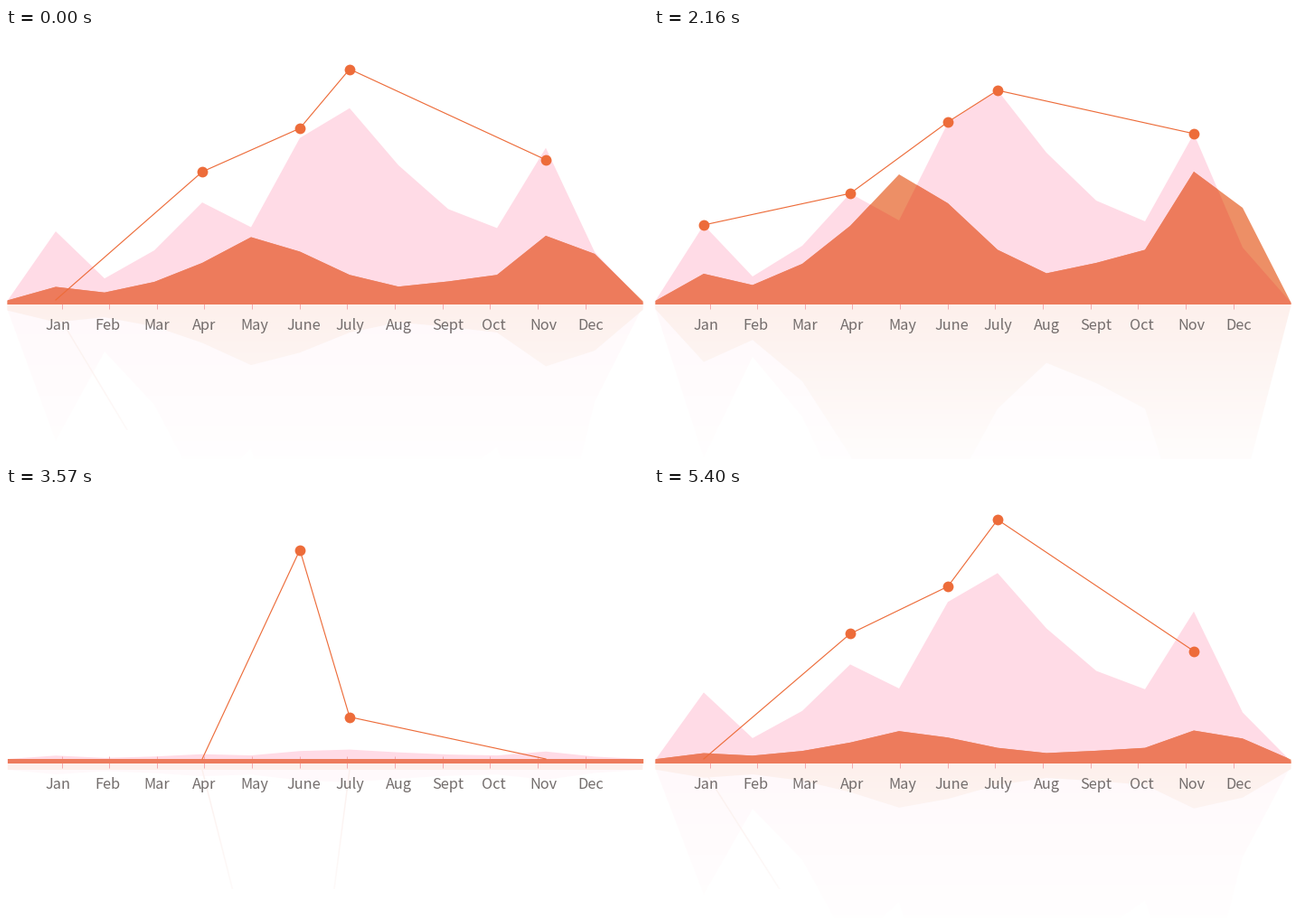
Animation of 710 by 477 pixels, one loop 5.43 s. Source, as a matplotlib script:

```python
import numpy as np
import matplotlib.pyplot as plt
from matplotlib.animation import FuncAnimation
from matplotlib.patches import Polygon, Rectangle

W, H, DPI = 710, 477, 100
PX = 72 / DPI
TICKS, STEPS = 181, 151
FULL_STEP = 44          # step at which the chart is completely open
BASE, FLOOR, MIRROR = 301, 306, 313
CENTRE = 353
MIRROR_SCALE, MIRROR_LAG = 1.95, 1

PINK = "#ffdbe6"
ORANGE = "#ed8f66"
ORANGE_ON_PINK = "#ed7b5c"
ACCENT = "#ed6c3a"

MONTHS = ["Jan", "Feb", "Mar", "Apr", "May", "June",
          "July", "Aug", "Sept", "Oct", "Nov", "Dec"]
LABEL_X = [57, 112, 166.5, 219, 274.5, 329.5, 380, 434, 489, 539, 594, 647]
MARK_X = 61.5 + 52.65 * np.arange(12)

AREA_X = np.array([1.5, 55, 109, 164, 217, 271, 325, 380, 434, 489, 543, 597, 651, 704.5])
PINK_TOP = np.array([302, 218, 275, 241, 183, 213, 105, 69, 138, 191, 214, 117, 243, 304])
ORANGE_TOP = np.array([302, 272, 284.5, 261, 219, 162, 194, 245.5, 271.5, 260, 245.5, 159, 199, 304])

DOT_X = np.array([55, 217, 325, 380, 597])
DOT_TOP = np.array([218, 183, 104, 69, 117.5])
DOT_START = np.array([3, -8, -18, -12, -4])
DOT_STEPS = 40


def ease(step, start, length):
    """In-out curve that is very steep around its middle."""
    x = min(max((step - start) / length, 0), 1)
    side = min(x, 1 - x) * 2
    value = 0.5 * (1 - (1 - side ** 1.8) ** (1 / 3))
    return value if x < 0.5 else 1 - value


def elastic(step):
    p = np.clip((step - DOT_START) / DOT_STEPS, 0, 1)
    value = 1 + 2 ** (-10 * p) * np.sin((p - 0.125) * 4 * np.pi)
    return np.where(p <= 0, 0, np.where(p >= 1, 1, value))


def timeline(tick):
    """Every sixth tick holds; the opening then plays backwards."""
    n = 5 * (tick // 6) + max(0, tick % 6 - 1)
    half = STEPS / 2
    return FULL_STEP - abs((n - FULL_STEP + half) % STEPS - half)


def area(top, width, height, mirrored=False):
    rise = (BASE - top) * height
    y = MIRROR + MIRROR_SCALE * rise if mirrored else BASE - rise
    x = CENTRE + (AREA_X - CENTRE) * width
    return np.column_stack([np.r_[x, x[-1], x[0]], np.r_[y, FLOOR, FLOOR]])


def pink_area(step, mirrored=False):
    return area(PINK_TOP, ease(step, -29.15, 13.6), ease(step, -16.5, 24), mirrored)


def orange_area(step, mirrored=False):
    return area(ORANGE_TOP, ease(step, -25.3, 13.6), ease(step, -10, 20), mirrored)


def polyline(y, started):
    """Segments with at least one raised end, separated by gaps."""
    xs, ys = [], []
    for i in range(len(DOT_X) - 1):
        if started[i] or started[i + 1]:
            xs += [DOT_X[i], DOT_X[i + 1], np.nan]
            ys += [y[i], y[i + 1], np.nan]
    return xs, ys


# The small margin keeps the pixel size from rounding down.
fig = plt.figure(figsize=((W + 0.01) / DPI, (H + 0.01) / DPI), dpi=DPI, facecolor="white")
ax = fig.add_axes([0, 0, 1, 1])
ax.axis("off")


def add_area(color, z):
    return ax.add_patch(Polygon(np.zeros((3, 2)), closed=True, fc=color, lw=0, zorder=z))


def add_line(color, width, z, **style):
    return ax.plot([], [], color=color, lw=width * PX, zorder=z, **style)[0]


pink_mirror = add_area("#fff9fb", 1)
line_mirror = add_line("#fcefec", 1.4, 2)
orange_mirror = add_area("#fdf0ec", 3)
fade = np.ones((171, 1, 4))
fade[:, 0, 3] = np.linspace(0, 0.85, 171)
ax.imshow(fade, extent=[0, W, H, FLOOR], aspect="auto", zorder=4)

pink = add_area(PINK, 5)
marks = add_line("#f4abb0", 1, 6, solid_capstyle="butt")
orange = add_area(ORANGE, 7)
overlap = add_area(ORANGE_ON_PINK, 8)
line = add_line(ACCENT, 1.15, 9)
dots = add_line(ACCENT, 0, 10, marker="o", ms=11.8 * PX, mew=0)

for x, month in zip(LABEL_X, MONTHS):
    ax.text(x, 334, month, ha="center", va="baseline", color="#736d6c",
            family="Noto Sans CJK JP", size=16.3 * PX, zorder=11)

ax.set_xlim(0, W)
ax.set_ylim(H, 0)
overlap.set_clip_path(pink)
line_mirror.set_clip_path(Rectangle((0, FLOOR), W, 445 - FLOOR, transform=ax.transData))


def update(tick):
    step = timeline(tick)
    late = step - MIRROR_LAG

    pink.set_xy(pink_area(step))
    orange.set_xy(orange_area(step))
    overlap.set_xy(orange_area(step))
    pink_mirror.set_xy(pink_area(late, True))
    orange_mirror.set_xy(orange_area(late, True))

    reach = 6.5 * ease(step, -27, 11)
    marks.set_data(np.repeat(MARK_X, 3), np.tile([304.5 - reach, 304.5 + reach, np.nan], 12))
    marks.set_visible(reach > 0.05)

    started = step > DOT_START
    y = BASE - (BASE - DOT_TOP) * elastic(step)
    line.set_data(*polyline(y, started))
    dots.set_data(DOT_X[started], y[started])
    y_mirror = MIRROR + MIRROR_SCALE * (BASE - DOT_TOP) * elastic(late)
    line_mirror.set_data(*polyline(y_mirror, late > DOT_START))
    return []


anim = FuncAnimation(fig, update, frames=TICKS, interval=30,
                     init_func=lambda: update(0), repeat=True, repeat_delay=0)
plt.show()
```
